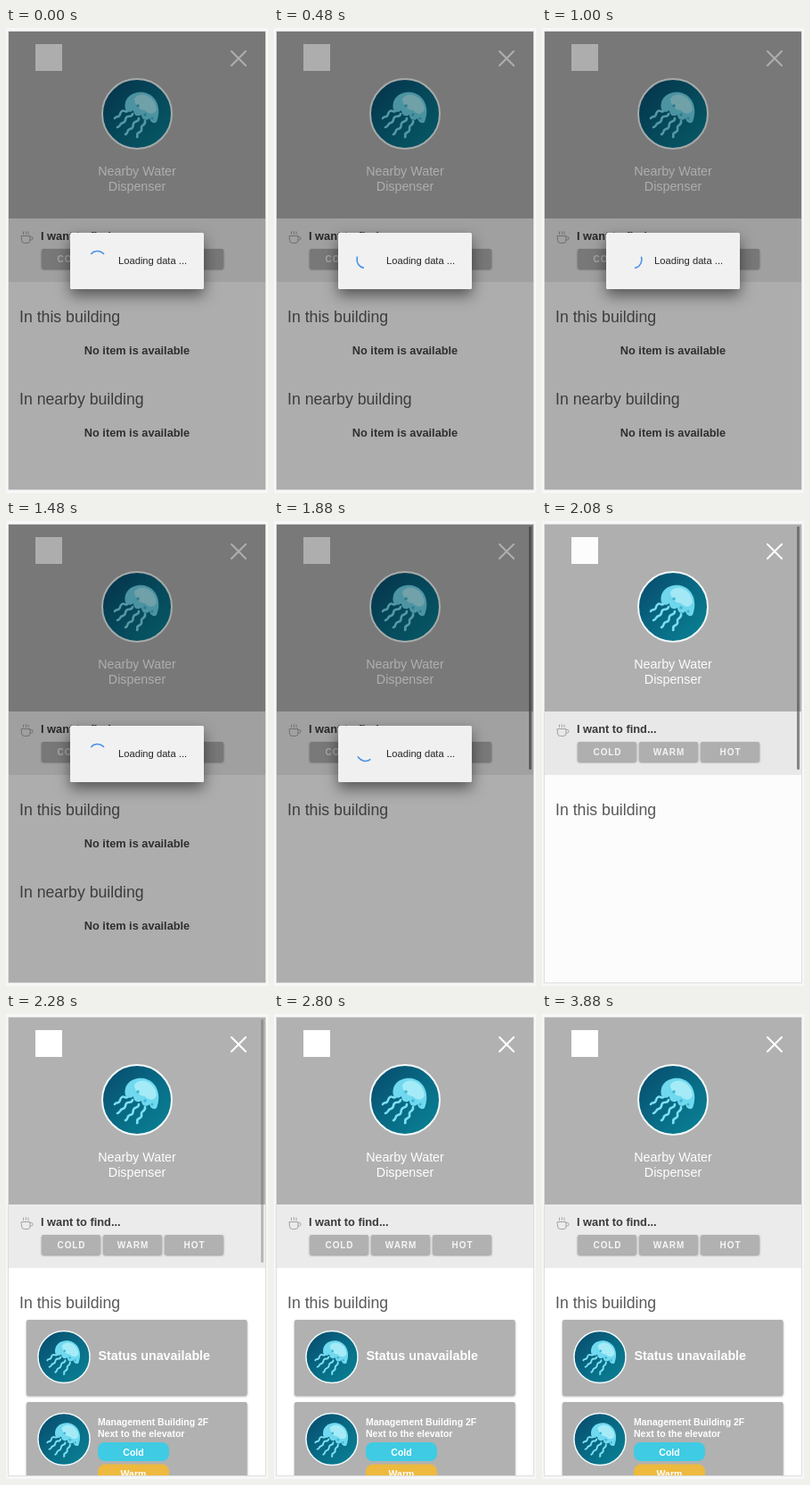
An HTML page for the animation above (4000 ms loop, 294 px wide and 520 px high).

```html
<!DOCTYPE html>
<html lang="en">
<head>
<meta charset="utf-8">
<title>Nearby Water Dispenser</title>
<style>
  html, body { margin: 0; width: 100%; height: 100%; overflow: hidden; background: #f6f7f7; }
  svg { display: block; }
  text { font-family: "Liberation Sans", Arial, sans-serif; }
  .bold { font-weight: bold; }
  .mid { text-anchor: middle; }
  .title { font-size: 14.3px; fill: #fff; }
  .heading { font-size: 17.7px; fill: #595959; }
  .empty { font-size: 12.75px; fill: #454545; }
  .label { font-size: 10px; letter-spacing: .9px; fill: #f6f6f6; }
  .small { font-size: 10.5px; fill: #fff; }
  .raised { fill: #b1b1b1; filter: drop-shadow(0 1px 1.2px rgba(0, 0, 0, .4)); }
  .panel { fill: #f1f1f1; filter: drop-shadow(0 7px 8px rgba(0, 0, 0, .5)); }
  .line { fill: none; stroke-linecap: round; stroke-linejoin: round; }
</style>
</head>
<body>
<svg width="294" height="520" viewBox="0 0 294 520">
  <defs>
    <linearGradient id="sea" x1="0" y1="0" x2="1" y2="1">
      <stop offset="0" stop-color="#07486a"/>
      <stop offset=".5" stop-color="#086a85"/>
      <stop offset="1" stop-color="#0a8496"/>
    </linearGradient>
    <clipPath id="screen"><path d="M3 4H291V516H3Z"/></clipPath>
    <g id="jelly">
      <circle r="39" fill="url(#sea)" stroke="#f4fafa" stroke-width="2"/>
      <g class="line" stroke="#7fe0f3" stroke-width="2.6">
        <path d="M-10-4c-2 4-4-1-7 1s-1 5-4 6-3 0-4 2"/>
        <path d="M-5 0c-1 5-5 1-7 4s0 5-4 6-2 4-6 5"/>
        <path d="M2 5c0 5-5 2-6 6s0 5-4 6-1 4-5 6"/>
        <path d="M9 8c1 5-4 4-4 7s1 4-3 6 0 4-2 5"/>
      </g>
      <path d="M-13-5C-16-19-3-26 8-24C22-21 28-6 22 9C19 12 15 9 14 5C10 9 5 6 5 1C0 4-4 1-4-4C-7-1-11-2-13-5Z" fill="#70d9ef"/>
      <path d="M-3-17C5-27 21-19 22-5C19 2 12 0 9-4C3-4-3-10-3-17Z" fill="#a5ebf7"/>
      <g fill="#3fb4d2">
        <circle cx="1" cy="-9" r="1.8"/>
        <circle cx="9" cy="1" r="1.8"/>
        <circle cx="17" cy="5" r="1.5"/>
      </g>
    </g>
  </defs>

  <path d="M2.5 3.5H291.5V516.5H2.5Z" fill="#fff" stroke="#dedede"/>
  <g clip-path="url(#screen)">
    <path d="M3 4H291V213H3Z" fill="#b1b1b1"/>
    <path d="M3 213H291V284H3Z" fill="#ebebeb"/>

    <rect x="33" y="18" width="30" height="30" fill="#fff"/>
    <path class="line" d="M253 26L269 42M269 26L253 42" stroke="#fff" stroke-width="2"/>
    <use href="#jelly" x="147" y="96"/>
    <text class="title mid" x="147" y="165">Nearby Water</text>
    <text class="title mid" x="147" y="182">Dispenser</text>

    <path class="line" d="M17.5 232.500H27V237.500Q27 240.500 24 240.500H20.500Q17.500 240.500 17.500 237.500ZM27 233.500H28.500Q30 233.500 30 235.200T28.500 237H27M19.500 230.500V228M22.300 230.500V227.500M25 230.500V228" stroke="#a4a4a4"/>
    <text class="bold" x="39" y="237" font-size="12.8" fill="#3a3a3a">I want to find...</text>
    <g id="buttons"></g>

    <text class="heading" x="15" y="329">In this building</text>
    <g id="none">
      <text class="empty bold mid" x="147" y="365">No item is available</text>
      <text class="heading" x="15" y="421">In nearby building</text>
      <text class="empty bold mid" x="147" y="457">No item is available</text>
    </g>

    <g id="cards">
      <rect class="raised" x="23" y="342" width="247.500" height="84.500" rx="2"/>
      <use href="#jelly" transform="translate(65 383.500) scale(.745)"/>
      <text class="bold" x="103.500" y="387" font-size="14.3" fill="#fff">Status unavailable</text>
      <rect class="raised" x="23" y="434" width="247.500" height="110" rx="2"/>
      <use href="#jelly" transform="translate(65 475.500) scale(.745)"/>
      <text class="small bold" x="103" y="460">Management Building 2F</text>
      <text class="small bold" x="103" y="473">Next to the elevator</text>
      <rect x="103" y="479" width="80" height="21" rx="8" fill="#3ecbe3"/>
      <text class="small bold mid" x="143" y="493.500">Cold</text>
      <rect x="103" y="503.500" width="80" height="21" rx="8" fill="#edb93e"/>
      <text class="small bold mid" x="143" y="518">Warm</text>
    </g>

    <rect id="bar" x="286" y="6" width="3" height="272" rx="1" fill="#4c4c4c" fill-opacity=".62"/>
    <path id="shade" d="M3 4H291V516H3Z"/>
    <g id="dialog">
      <rect class="panel" x="72" y="229" width="150" height="63" rx="1.500"/>
      <circle id="spinner" class="line" cx="102.500" cy="259" r="9.500" stroke="#4a90ea" stroke-width="1.600" pathLength="360" stroke-dasharray="101 259" style="stroke-linecap:butt"/>
      <text x="126" y="264" font-size="11.2" fill="#262626">Loading data ...</text>
    </g>
  </g>
</svg>
<script>
  const LOOP = 4000;
  const $ = id => document.getElementById(id);
  const clamp = v => Math.min(1, Math.max(0, v));
  const show = (id, opacity) => $(id).setAttribute('opacity', opacity);

  $('buttons').innerHTML = ['COLD', 'WARM', 'HOT'].map((name, i) => {
    const x = 40 + 69 * i;
    return `<rect class="raised" x="${x}" y="247" width="66" height="22" rx="2"/>
      <text class="label bold mid" x="${x + 33.5}" y="261.700">${name}</text>`;
  }).join('');

  // The picture advances ten times a second, on an 80/120 ms beat.
  const beat = t => 200 * Math.floor(t / 200) + (t % 200 < 80 ? 0 : 100);

  function draw(t) {
    const k = clamp((t - 1895) / 205);
    const leave = Math.pow(k, 1.4);
    const size = 1 - .1 * leave;

    show('none', t < 1900 ? 1 : 0);
    show('cards', t < 2200 ? 0 : 1);
    show('bar', t < 1900 ? 0 : clamp((2400 - t) / 200));
    show('shade', t < 2200 ? .32 - .31 * leave : 0);
    show('dialog', 1 - leave);
    $('dialog').setAttribute('transform',
      `translate(147 260.500) scale(${size}) translate(-147 -260.500)`);
    $('spinner').setAttribute('transform',
      `rotate(${t / 750 * 360 - 140} 102.500 259)`);
  }

  function tick() {
    draw(beat(performance.now() % LOOP));
    requestAnimationFrame(tick);
  }
  tick();
</script>
</body>
</html>
```
